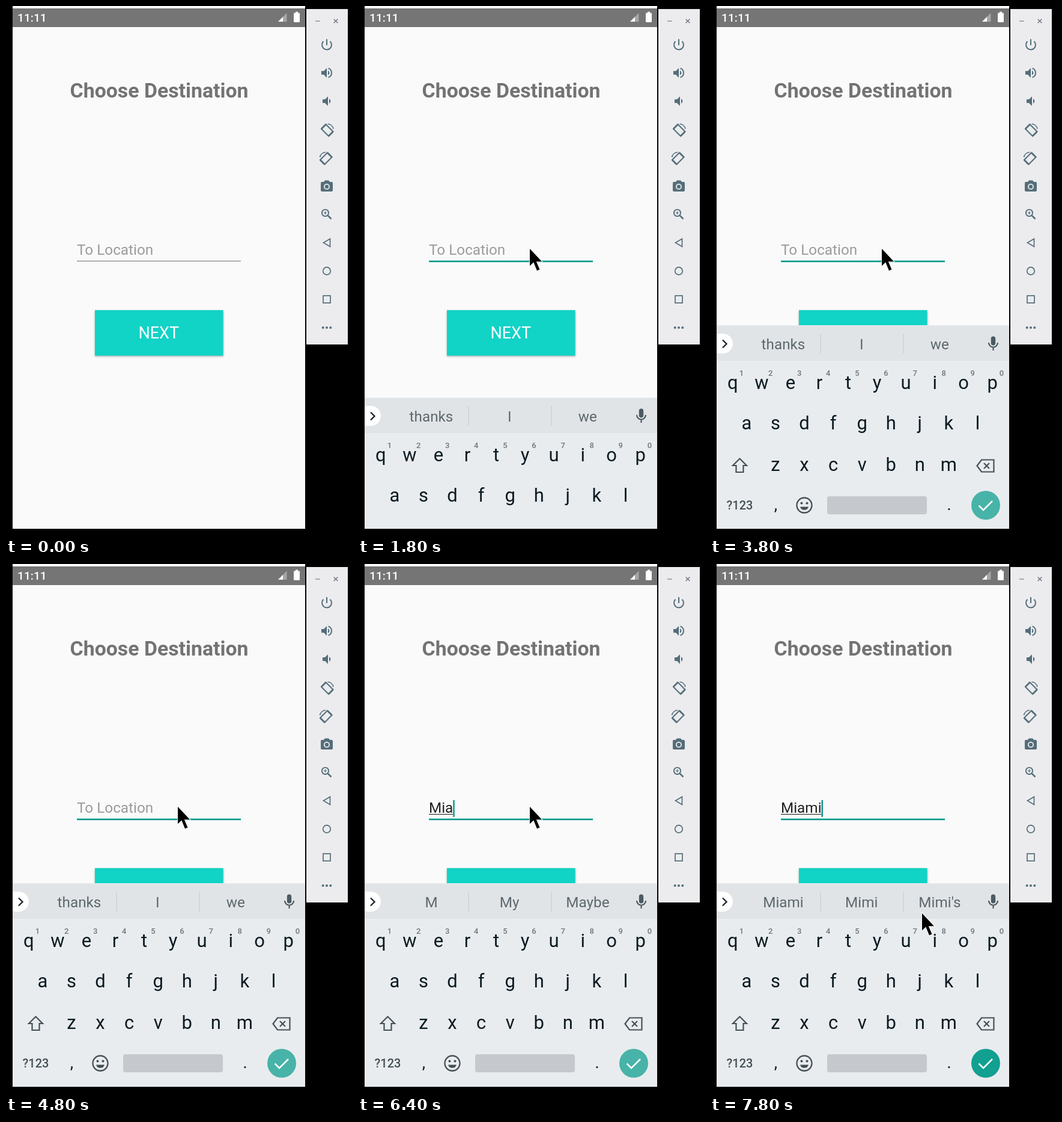
Write an HTML page with a canvas that moves like this. It is 576x880 px and loops after 8 s.

```html
<!DOCTYPE html>
<html lang="en">
<head>
<meta charset="utf-8">
<title>Choose Destination</title>
<style>
html, body { margin: 0; width: 100%; height: 100%; overflow: hidden; background: #000; }
canvas { display: block; }
</style>
</head>
<body>
<canvas id="stage" width="576" height="880"></canvas>
<script>
const c = document.getElementById('stage').getContext('2d');
const LOOP = 8000, STEP = 200;
const TEAL = '#009688', ICON = '#546e7a', KEY = '#0b1a21', KEY_ICON = '#455056';

function rect(x, y, w, h, color) {
  c.fillStyle = color;
  c.fillRect(x, y, w, h);
}

function text(s, x, y, size, color, align = 'center', weight = 400) {
  c.font = `${weight} ${size}px Roboto, sans-serif`;
  c.textAlign = align;
  c.fillStyle = color;
  c.fillText(s, x, y);
}

function disc(x, y, r, color) {
  c.fillStyle = color;
  c.beginPath();
  c.arc(x, y, r, 0, 7);
  c.fill();
}

function ring(x, y, r, color, width, from = 0, to = Math.PI * 2) {
  c.strokeStyle = color;
  c.lineWidth = width;
  c.beginPath();
  c.arc(x, y, r, from, to);
  c.stroke();
}

function path(d, color, width) {
  const p = new Path2D(d);
  if (width) {
    c.strokeStyle = color;
    c.lineWidth = width;
    c.stroke(p);
  } else {
    c.fillStyle = color;
    c.fill(p);
  }
}

function at(x, y, draw) {
  c.save();
  c.translate(x, y);
  draw();
  c.restore();
}

// Value of the last [time, value] pair that has been reached
function held(track, t) {
  let value = track[0][1];
  for (const [start, v] of track) if (t >= start) value = v;
  return value;
}

function speaker(loud) {
  path('M-9-3H-5L0-8V8L-5 3H-9Z', ICON);
  path('M2-4A4.5 4.5 0 0 1 2 4Z', ICON);
  if (loud) path('M2.5-7.6A8 8 0 0 1 2.5 7.6', ICON, 2);
}

function rotateIcon() {
  path('M-9.5-1L-2-8.5L10 3.5L2.5 11Z', ICON, 2);
  path('M-9.5-1L-2-8.5M10 3.5L2.5 11', ICON, 2.8);
  path('M1-9.3A10.5 10.5 0 0 1 10.5-1', ICON, 1.6);
}

function panel() {
  rect(500, 5, 69, 557, '#ececee');
  rect(515, 24.5, 8, 1.2, '#76868e');
  path('M545.7 21.7L552.3 28.3M552.3 21.7L545.7 28.3', '#5f727b', 1.3);
  at(534, 64, () => {
    ring(0, 0.5, 8, ICON, 2, -0.82, Math.PI + 0.82);
    rect(-1, -9, 2, 10, ICON);
  });
  at(534, 111, () => speaker(true));
  at(536, 158, () => speaker(false));
  at(534.5, 205, rotateIcon);
  at(533, 252, () => { c.scale(-1, 1); rotateIcon(); });
  at(534, 299, () => {
    path('M-8-7H-5L-3-9.5H3L5-7H8Q10-7 10-5V7Q10 9 8 9H-8Q-10 9-10 7V-5Q-10-7-8-7Z', ICON);
    disc(0, 1, 5, '#ececee');
    disc(0, 1, 3.2, ICON);
  });
  at(531.5, 343.5, () => {
    ring(0, 0, 5.6, ICON, 1.9);
    path('M4.3 4.3L10 10', ICON, 2.6);
    path('M-2.8 0H2.8M0-2.8V2.8', ICON, 1.2);
  });
  path('M528.5 393L539.5 386.5V399.5Z', ICON, 1.7);
  ring(534, 440, 6.3, ICON, 1.7);
  c.strokeRect(528, 481, 12, 12);
  for (const dx of [-6.3, 0, 6.3]) disc(534 + dx, 534, 2, ICON);
}

function statusBar() {
  rect(11, 0, 487, 4, '#fff');
  rect(11, 4, 487, 31, '#757575');
  text('11:11', 19, 26, 19.2, '#fff', 'left', 500);
  path('M453 26L467.5 11.5V26Z', '#a6a6a6');
  path('M453 26L461 18V26Z', '#fff');
  path('M482 9.5H486V11.5H488Q489 11.5 489 12.5V26Q489 27 488 27H480Q479 27 479 26V12.5Q479 11.5 480 11.5H482Z', '#fff');
}

function form(t) {
  const focused = t >= 1400;
  const typed = held([[0, ''], [6000, 'M'], [6200, 'Mi'], [6400, 'Mia'], [6600, 'Miami']], t);
  const caret = held([[0, 0], [1400, 1], [1800, 0], [2400, 1], [2800, 0], [3400, 1],
    [3800, 0], [4400, 1], [4800, 0], [5400, 1], [7000, 0], [7600, 1]], t);

  text('Choose Destination', 255, 152, 33.8, '#737373', 'center', 700);
  text(typed || 'To Location', 118, 413, 24.3, typed ? '#212121' : '#9b9b9b', 'left');
  const width = typed ? c.measureText(typed).width : 0;
  if (typed) rect(118, 415, width, 1.2, '#333');
  if (focused) rect(118, 422.7, 273, 2.6, TEAL);
  else rect(118, 423, 273, 1, '#6e6e6e');
  if (caret) rect(118 + width, 392, 2.4, 28, TEAL);

  c.save();
  c.shadowColor = 'rgba(0,0,0,.3)';
  c.shadowBlur = 3;
  c.shadowOffsetY = 1;
  rect(148, 505, 213.5, 75.5, '#11d3c6');
  c.restore();
  text('NEXT', 254.3, 552, 27, '#fff');
}

function keyRow(letters, x, y) {
  [...letters].forEach((k, i) => text(k, x + i * 48.05, y, 31, KEY));
}

function strip(t) {
  rect(11, 531, 487, 58, '#e1e4e7');
  c.fillStyle = '#fff';
  c.beginPath();
  c.roundRect(11, 544, 27, 33, [0, 16.5, 16.5, 0]);
  c.fill();
  path('M21 554.5L27.5 561L21 567.5', '#20282c', 2.4);
  rect(183.5, 544, 1, 33, '#c3c7ca');
  rect(321.5, 544, 1, 33, '#c3c7ca');
  const words = held([[0, 'thanks I we'], [6000, 'M My Maybe'], [6600, "Miami Mimi Mimi's"]], t);
  words.split(' ').forEach((w, i) => text(w, 122 + i * 130.2, 570, 24.3, '#5d686e'));
  at(471.5, 561, () => {
    c.fillStyle = '#4b5b63';
    c.beginPath();
    c.roundRect(-3.7, -12.5, 7.4, 15, 3.7);
    c.fill();
    path('M-7.5-2A7.5 7.5 0 0 0 7.5-2M0 6V11', '#4b5b63', 2.2);
  });
}

function keyboard(t) {
  rect(11, 530, 487, 338, '#e9ecef');
  strip(t);
  keyRow('qwertyuiop', 37.8, 636);
  [...'1234567890'].forEach((n, i) => text(n, 52.5 + i * 48.1, 614, 13, '#6c777c', 'center', 500));
  keyRow('asdfghjkl', 61, 703);
  keyRow('zxcvbnm', 109, 772);
  path('M49.5 751.5L61 763H55.5V774H43.5V763H38Z', KEY_ICON, 2.2);
  path('M444.5 763.5L452 753.5H472.5V773.5H452Z', KEY_ICON, 2.2);
  path('M456 759L465 768M465 759L456 768', KEY_ICON, 2.2);
  text('?123', 49.5, 836, 20, KEY_ICON, 'center', 500);
  text(',', 109.5, 837, 27, KEY);
  text('.', 398, 837, 27, KEY);
  ring(157, 829, 12.5, KEY_ICON, 2.3);
  disc(152.5, 825.5, 2, KEY_ICON);
  disc(161.5, 825.5, 2, KEY_ICON);
  path('M150 831.5A7.3 7.3 0 0 0 164 831.5Z', KEY_ICON);
  c.fillStyle = '#c5c9cd';
  c.beginPath();
  c.roundRect(195, 814, 166, 30, 4);
  c.fill();
  disc(459, 829, 24, t >= 7600 ? '#12a091' : '#48b3a8');
  path('M447.5 829.5L455 837L470 822', '#fff', 2.5);
}

function pointer(t) {
  const spot = held([[0, null], [200, [353, 551]], [600, [340, 522]], [800, [308, 452]],
    [1000, [286, 403]], [6800, [380, 660]], [7000, [443, 832]], [7200, [452, 843]],
    [7800, [353, 580]]], t);
  if (!spot) return;
  at(spot[0], spot[1], () => {
    const d = 'M0 0V28.5L6.3 22.5L12 36.5L16.5 34.5L10.8 21.3H20Z';
    path(d, 'rgba(255,255,255,.8)', 2);
    path(d, '#000');
  });
}

function draw(t) {
  rect(0, 0, 576, 880, '#000');
  rect(11, 4, 487, 864, '#fafafa');
  statusBar();
  form(t);
  if (t >= 1800) {
    c.save();
    c.beginPath();
    c.rect(11, 35, 487, 833);
    c.clip();
    c.translate(0, t < 2000 ? 120 : 0);
    keyboard(t);
    c.restore();
  }
  panel();
  pointer(t);
}

const begin = performance.now();
function tick() {
  const t = (performance.now() - begin) % LOOP;
  draw(Math.floor(t / STEP) * STEP);
  requestAnimationFrame(tick);
}
tick();
</script>
</body>
</html>
```
